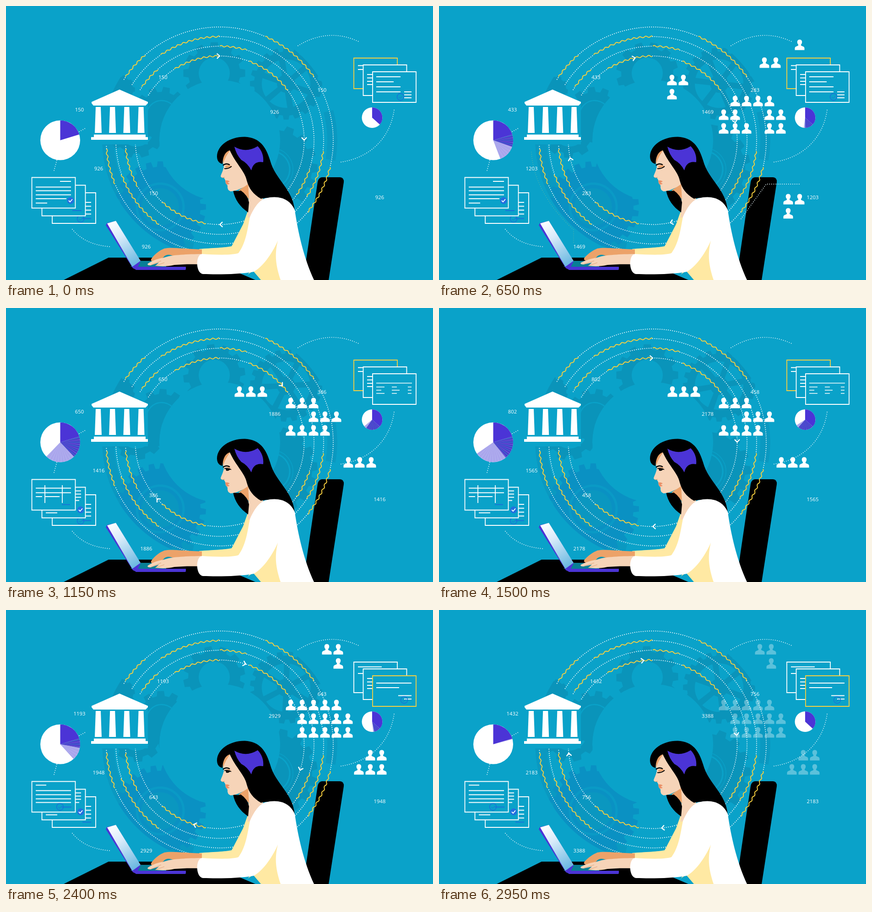
An HTML page with a canvas that plays this animation: 933 by 600 pixels, repeating every 3 s.

```html
<!DOCTYPE html>
<html lang="en">
<head>
<meta charset="utf-8">
<title>Data at work</title>
<style>
html, body { margin: 0; width: 100%; height: 100%; overflow: hidden; background: #0aa2c9; }
canvas { display: block; }
</style>
</head>
<body>
<canvas id="stage" width="933" height="600"></canvas>
<script>
const ctx = document.getElementById('stage').getContext('2d');
const BG = '#0aa2c9', GEAR = '#0a94ba', DEEP = '#0a91c3', YELLOW = '#f8d03f';
const PURPLE = '#4b34d6', BLUE = '#1a6fd8', SKIN = '#f6d4b8', TAN = '#eca269', CREAM = '#ffe9a3';
const CX = 467, CY = 294, LOOP = 3000;
const rad = deg => deg * Math.PI / 180;

function fill(d, color) {
  ctx.fillStyle = color;
  ctx.fill(new Path2D(d));
}
function line(d, color = '#fff', width = 1.8) {
  ctx.strokeStyle = color;
  ctx.lineWidth = width;
  ctx.stroke(new Path2D(d));
}
function disc(x, y, r, color) {
  ctx.beginPath();
  ctx.arc(x, y, r, 0, 7);
  ctx.fillStyle = color;
  ctx.fill();
}
function arc(x, y, r, from, to, color, width) {
  ctx.beginPath();
  ctx.arc(x, y, r, rad(from), rad(to));
  ctx.strokeStyle = color;
  ctx.lineWidth = width;
  ctx.stroke();
}
function dotted(draw) {
  ctx.save();
  ctx.lineCap = 'round';
  ctx.setLineDash([0, 4.6]);
  draw();
  ctx.restore();
}

// Gears, seen only inside a wide ring
function gear(x, y, outer, root, teeth, turn, hole = 0, color = GEAR) {
  const step = 360 / teeth;
  ctx.beginPath();
  for (let i = 0; i < teeth; i++) {
    for (const [k, r] of [[-.32, root], [-.22, outer], [.22, outer], [.32, root]]) {
      const a = rad(turn + (i + k) * step);
      ctx.lineTo(x + r * Math.cos(a), y + r * Math.sin(a));
    }
  }
  ctx.closePath();
  if (hole) {
    ctx.moveTo(x + hole, y);
    ctx.arc(x, y, hole, 0, 7);
  }
  ctx.fillStyle = color;
  ctx.fill('evenodd');
}
function drawGears(t) {
  const turn = t / LOOP;
  ctx.save();
  ctx.beginPath();
  ctx.arc(CX, CY, 257, 0, 7);
  ctx.moveTo(CX + 132, CY);
  ctx.arc(CX, CY, 132, 0, 7);
  ctx.clip('evenodd');

  arc(CX, CY, 244, 104, 178, '#0a99c1', 26);
  arc(CX, CY, 246, -15, 10, '#0a99c1', 22);
  gear(250, 183, 32, 28, 10, 36 * turn);
  gear(285, 270, 63, 53, 10, -72 * turn, 38);
  gear(455, 147, 68, 57, 12, -90 + 60 * turn, 34);

  gear(612, 170, 79, 70, 20, -36 * turn);
  for (let i = 0; i < 6; i++) {
    const a = -60 * turn + i * 60 + 20;
    ctx.beginPath();
    ctx.arc(612, 170, 53, rad(a + 7), rad(a + 53));
    ctx.arc(612, 170, 20, rad(a + 43), rad(a + 17), true);
    ctx.fillStyle = BG;
    ctx.fill();
  }

  gear(340, 240, 63, 52, 12, 60 * turn + 10);
  arc(340, 240, 33, 190, 330, BG, 2.5);
  gear(585, 355, 96, 84, 16, 45 * turn);
  arc(580, 358, 40, -75, 60, BG, 3);
  arc(580, 358, 47, -75, 60, BG, 1.2);

  gear(337, 440, 100, 88, 24, -30 * turn, 0, DEEP);
  disc(337, 440, 41, '#0a97c0');
  arc(337, 440, 51, 0, 360, '#0a9ac6', 5);
  ctx.restore();
}

// Each ring: radius, then the wavy stretches in degrees
const rings = [
  [248, [-146, -131], [-66.4, -34], [13.7, 39.3], [157.3, 175.8]],
  [227, [-124.6, -90], [6, 33], [126, 161]],
  [206, [-145.5, -130.7], [-90, -73.2], [18.2, 35.4], [150.3, 175]],
  [184.5, [-122.4, -90], [-69.6, -36.4], [99.3, 133]]
];
function drawRings() {
  for (const [r, ...waves] of rings) {
    let start = -147.5;
    for (const [from, to] of [...waves, [177.5, 177.5]]) {
      dotted(() => arc(CX, CY, r, start, from, '#fff', 2));
      start = to;
      ctx.beginPath();
      for (let a = from; a < to; a += .4) {
        const q = r + 1.5 * Math.sin(rad(a - from) * r / 2.1);
        ctx.lineTo(CX + q * Math.cos(rad(a)), CY + q * Math.sin(rad(a)));
      }
      ctx.strokeStyle = YELLOW;
      ctx.lineWidth = 1.9;
      ctx.stroke();
    }
  }
}
function drawArrows(t) {
  for (let i = 0; i < 4; i++) {
    const a = (.12 * t + 269 + 90 * i) % 360;
    if (a > 175 && a < 232) continue;
    ctx.save();
    ctx.translate(CX, CY);
    ctx.rotate(rad(a + 90));
    line('M-3 -190L3 -184.5L-3 -179', '#fff', 2.3);
    ctx.restore();
  }
}
function drawLinks(t) {
  dotted(() => {
    line('M638 87Q705 46 773 79M848 228C840 285 800 332 730 342M145 489Q173 523 227 527M111 338L104 364M160 275L173 268', '#e8f7fb', 1.8);
    if (t >= 500 && t < 850) {
      line('M660 466L715 390H791', '#e8f7fb', 1.8);
      line('M202 320C206 390 250 450 294 490V520', '#8fbf8a', 1.2);
    }
  });
}

function drawBank() {
  fill('M187 209L248 183L310 209V303H187Z', BG);
  fill('M248 183L310 210V213L305 218H191L187 213V210Z', '#fff');
  for (let x = 201.5; x < 300; x += 31.2) fill(`M${x - 5.5} 221h11l2 57h-15z`, '#fff');
  fill('M192 281.5H305V287H310V293H186V287H192Z', '#fff');
}

// Pie growth in degrees at given times
const growth = [[0, 0], [650, 86], [1150, 151], [1500, 162], [2000, 107], [2400, 65], [2950, 2], [3000, 0]];
function grown(t) {
  const i = growth.findIndex(p => p[0] > t);
  const [t0, a] = growth[i - 1], [t1, b] = growth[i];
  return a + (b - a) * (t - t0) / (t1 - t0);
}
function pie(x, y, r, edge, extra, striped) {
  const end = edge + extra, mid = edge + extra * striped;
  const slice = (from, to, color) => {
    ctx.beginPath();
    ctx.moveTo(x, y);
    ctx.arc(x, y, r, rad(from), rad(to));
    ctx.fillStyle = color;
    ctx.fill();
  };
  disc(x, y, r, '#fff');
  if (extra > 0) {
    slice(mid, end, '#aaa5ec');
    slice(edge, mid, '#4b3ccb');
    for (let a = edge + 2, i = 0; a < mid; a += 7, i++) slice(a, Math.min(a + 1.3, mid), i % 2 ? '#7a70dc' : '#2c9bd0');
    for (let a = mid + 4; a < end; a += 9) slice(a, Math.min(a + 1, end), '#b9c0f0');
  }
  slice(-90, edge, PURPLE);
}

function sheet(x, y, edge = '#fff') {
  ctx.fillStyle = BG;
  ctx.fillRect(x, y, 95, 67);
  line(`M${x} ${y}h95v67h-95z`, edge);
}
function seal(x, y) {
  arc(x, y, 7.5, 0, 360, BLUE, 1.4);
  line(`M${x - 4} ${y + 1}l4 2l4 -5`, BLUE, 1);
}
function check(x, y) {
  disc(x, y, 7.5, '#2370df');
  line(`M${x - 4} ${y}l3 3l5 -6`);
}
function drawRightSheets(page) {
  sheet(760, 114, page < 2 ? YELLOW : '#fff');
  line(page < 2 ? 'M769 130.5H780M769 139H780' : 'M769 124.5H821M769 139H780');
  sheet(780.5, 129);
  line('M789 150H801M789 157.5H801M789 165H801M789 172H801');
  sheet(801, 144, page < 2 ? '#fff' : YELLOW);
  if (page === 0) {
    line('M809 155H862M809 166H847M809 177H862M809 188H862M870 188H886M870 194.5H886M870 201H886');
    seal(862, 199);
  } else if (page === 1) {
    line('M809 164.5H887M809 173H827M843 173H854M878 173H886M809 180H820M843 180H860M878 180H886M809 187H827M843 187H854M878 187H886', '#fff', 1.5);
  } else {
    line('M809 160H886M809 170H859M857 187.5H886M870 195H886');
    seal(870, 197);
  }
}
function drawLeftSheets(page) {
  sheet(101, 409);
  line('M174 430H186M174 438.5H186M174 447H186M174 455.5H186');
  if (page < 2) {
    seal(163, 466);
    line('M167 465.5H186', BLUE);
  } else line('M167 464.5H186', BLUE);
  sheet(78.5, 392.5);
  if (page === 0) line('M145 448H165', BLUE);
  else {
    line('M87 448.5H112M152 400.5H164M152 407.5H164M152 414.5H164M152 421.5H160');
    check(163, 442);
  }
  sheet(56.5, 375.5);
  if (page === 0) {
    line('M118 384H142M65 396.5H142M65 404.5H142M65 413.5H142M65 422H132M65 431.5H90');
    check(141, 426);
  } else if (page === 1) {
    line('M65 394.5H142M65 404.5H142M65 413H79M85 388V427M85 413H117M123 388V427');
    line('M122 430.5H140', BLUE);
  } else {
    line('M65 383.5H88M65 395.5H142M65 404.5H142M65 413.5H142M65 421.5H142');
    seal(118, 431);
    line('M122 431.5H143', BLUE);
  }
}

// Groups of people: y, first x, how many in the row
const crowds = [
  [[162, 509, 2], [193, 509, 1], [85, 788, 1], [124, 711, 2], [208, 647, 4], [238, 622, 2], [238, 722, 2], [268, 622, 3], [268, 722, 2], [423, 763, 2], [454, 763, 1]],
  [[183, 510, 3], [208, 622, 3], [238, 672, 3], [268, 622, 4], [338, 748, 3]],
  [[86, 701, 2], [117, 726, 1], [208, 622, 5], [238, 647, 5], [268, 647, 5], [318, 796, 2], [349, 771, 3]]
];
const person = new Path2D('M-10.5 11.5V7.5Q-10.5 4 -6 3L-3 1.5V-.5C-7 -5 -5.5 -11.5 0 -11.5S7 -5 3 -.5V1.5L6 3Q10.5 4 10.5 7.5V11.5Z');
function drawPeople(page, t) {
  const phase = t % 1000;
  ctx.fillStyle = '#fff';
  ctx.globalAlpha = Math.min(1, phase / 120, (1000 - phase) / 150);
  for (const [y, x, count] of crowds[page]) {
    for (let i = 0; i < count; i++) {
      ctx.save();
      ctx.translate(x + 25 * i, y);
      ctx.fill(person);
      ctx.restore();
    }
  }
  ctx.globalAlpha = 1;
}

// Counters: start, gain per ms, two places
const counters = [
  [150, .4347, [160.5, 227], [343, 155.5]],
  [926, .426, [202.5, 356], [816.5, 418.5]],
  [926, .8347, [587, 231.5], [306.5, 527]],
  [150, .20536, [322.5, 410], [690.5, 184]]
];
function drawCounters(t) {
  ctx.font = '11.3px "Open Sans", "Noto Sans", sans-serif';
  ctx.textAlign = 'center';
  ctx.fillStyle = '#fff';
  for (const [start, rate, ...places] of counters) {
    for (const [x, y] of places) ctx.fillText(Math.round(start + rate * t), x, y + 4);
  }
}

function drawDesk() {
  fill('M126 600L224 551H430L545 600Z', '#000');
  fill('M272 571L293 558H350V571Z', '#087f96');
  fill('M218 480L221 475L240 471L294 559L285 578L277 574Z', PURPLE);
  const shine = ctx.createLinearGradient(228, 472, 285, 570);
  shine.addColorStop(0, '#fff');
  shine.addColorStop(.35, '#d9ebfa');
  shine.addColorStop(1, '#62b5df');
  fill('M221 476L240 470.5L294 558L276 571Z', shine);
  fill('M280 571H393V576Q393 578 390 578H284Z', PURPLE);
}
function drawHands(tapping) {
  const dy = tapping ? -2 : 0;
  fill(`M318 ${553 + dy}C326 542 336 535 346 531C360 528 380 531 428 533V547L372 548C352 544 342 550 336 557L322 ${560 + dy}Q314 ${558 + dy} 318 ${553 + dy}Z`, TAN);
  fill('M343 552C347 543 359 543 366 548Z', '#0a93b0');
  fill(`M310 ${564 + dy}C322 556 333 553 345 551C362 545 386 544 426 543V566C400 565 385 566 368 567C350 571 338 570 326 569L334 562L316 ${568 + dy}Q307 ${568 + dy} 310 ${564 + dy}Z`, SKIN);
  line(`M317 ${567 + dy}L339 558M326 569L346 562`, '#d99a6a', .8);
}
function drawFace(open) {
  fill('M486 316L474 340L476 352C474 362 470 368 469 373Q471 377 476 376L479 381L480 388L484 393Q483 404 491 406C504 405 518 398 528 391L530 340L510 312Z', SKIN);
  fill('M490 316Q474 318 473 330L474 346Q480 328 490 316Z', TAN);
  line('M474 349Q481 343 489 348', '#000', 2.4);
  if (open) {
    fill('M479 351Q486 346 493 351L486 350Z', TAN);
    line('M477 352Q484 349 492 354', '#000', 1.8);
    fill('M480 352L490 353Q486 358 481 356Z', '#000');
  } else {
    fill('M479 350Q487 346 493 351L480 355Z', TAN);
    line('M477 356Q486 357 493 351', '#000', 2);
  }
  fill('M479 382Q484 381 489 384L484 387Q489 388 488 390L482 391L480 387Z', '#eb8f67');
  line('M472 376L478 375', TAN, 1);
}
function drawWoman(t) {
  fill('M422 532C450 530 480 529 493 526L518 478L530 444L550 462L525 547H427Z', CREAM);
  drawHands(t % 400 >= 100 && t % 400 < 325);
  fill('M528 588L594 514L606 600H557L540 580Z', CREAM);
  fill('M525 382L530 420L528 464L540 460L562 422L548 392Z', SKIN);
  fill('M508 404L529 389L531 424Q520 408 508 404Z', TAN);
  fill('M496 403Q504 407 513 404Q528 414 531 430L529 452C512 440 500 425 496 403Z', '#000');
  drawFace(t >= 900 && t < 2700);
  fill('M461 329C462 304 490 286 522 286.5C554 288 568 308 577 338C589 382 627 400 631 449C615 425 590 415 557 422C540 412 531 400 526 382C522 362 502 345 489 316Q474 321 473 346Q461 343 461 329Z', '#000');
  fill('M499 308Q524 323 550 307Q564 322 562 342Q541 338 536 360Q528 344 514 337Q503 325 499 308Z', PURPLE);
  fill('M428 543C460 545 495 546 508 541C525 518 528 486 533 462C540 446 551 426 567 421C600 413 622 425 631 447C638 495 650 550 673 600H600C590 570 586 545 594 514C580 545 560 572 541 582C510 588 460 588 430 587C414 584 414 545 428 543Z', '#fff');
}

function draw(t) {
  const page = Math.floor(t / 1000);
  ctx.fillStyle = BG;
  ctx.fillRect(0, 0, 933, 600);
  drawGears(t);
  fill('M690 375H730Q739 376 738 386L705 600H660L656 555L681 385Q683 376 690 375Z', '#000');
  drawLinks(t);
  drawRings();
  drawArrows(t);
  drawBank();
  const extra = grown(t);
  pie(118.5, 294, 43.5, -17, extra, .42);
  pie(800, 244.5, 22.5, 42, extra * .65, .85);
  drawRightSheets(page);
  drawLeftSheets(page);
  drawPeople(page, t);
  drawCounters(t);
  drawDesk();
  drawWoman(t);
}

const begin = performance.now();
function tick() {
  const t = (performance.now() - begin) % LOOP;
  draw(Math.floor(t / 50) * 50);
  requestAnimationFrame(tick);
}
tick();
</script>
</body>
</html>
```
